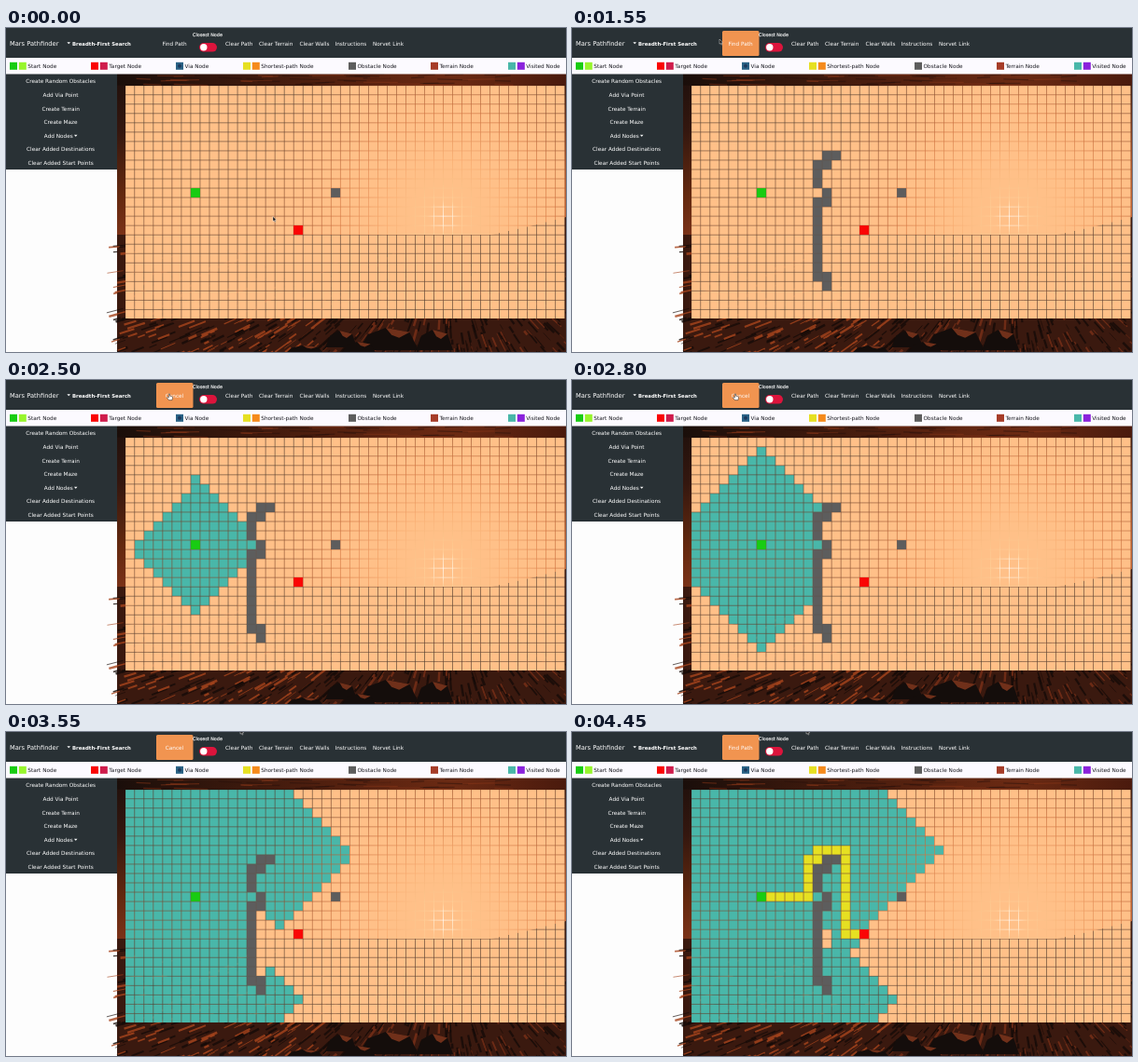
An HTML page that plays this animation: 600x348 px, repeating every 4.5 s.

```html
<!DOCTYPE html>
<html lang="en">
<head>
<meta charset="utf-8">
<title>Pathfinding grid</title>
<style>
  html, body { margin: 0; width: 100%; height: 100%; overflow: hidden; background: #fdfdfd; }
  svg { display: block; width: 100vw; height: 100vh; }
  text { font-family: "DejaVu Sans", Verdana, sans-serif; font-size: 5.75px; fill: #fff; }
</style>
</head>
<body>
<svg id="stage" viewBox="0 0 600 348">
  <defs>
    <linearGradient id="sky" x1="0" y1="0" x2="0" y2="1">
      <stop offset="0" stop-color="#1f100c"/>
      <stop offset=".35" stop-color="#34170f"/>
      <stop offset=".75" stop-color="#64290f"/>
      <stop offset="1" stop-color="#7a3218"/>
    </linearGradient>
    <linearGradient id="haze" x1="0" y1="0" x2="1" y2="0">
      <stop offset="0" stop-color="#1a0e0a"/>
      <stop offset=".5" stop-color="#55210f"/>
      <stop offset=".75" stop-color="#6b2a13"/>
      <stop offset="1" stop-color="#4a1a0d"/>
    </linearGradient>
    <radialGradient id="sun" gradientUnits="userSpaceOnUse" cx="470" cy="203" r="210">
      <stop offset="0" stop-color="#fff"/>
      <stop offset=".05" stop-color="#fff0d8"/>
      <stop offset=".09" stop-color="#ffd09a"/>
      <stop offset=".3" stop-color="#f8ab70"/>
      <stop offset=".55" stop-color="#dc7a44" stop-opacity=".9"/>
      <stop offset="1" stop-color="#a04520" stop-opacity="0"/>
    </radialGradient>
  </defs>
  <rect width="600" height="348" fill="#fdfdfd"/>
  <g id="scene">
    <rect x="119" y="50" width="481" height="172" fill="url(#sky)"/>
    <path d="M119 222H520Q560 214 600 203V348H119Z" fill="#3a190f"/>
    <g id="ground"></g>
    <rect x="128" y="62" width="470.5" height="250" fill="#86725a" opacity=".5"/>
    <path d="M119 50H600V203Q560 214 520 222H119Z" fill="url(#sun)"/>
    <rect x="119" y="49" width="481" height="12.6" fill="url(#haze)"/>
    <g id="clouds"></g>
  </g>
  <g id="cells"></g>
  <rect width="600" height="32.2" fill="#293135"/>
  <rect y="32.2" width="600" height="17.3" fill="#fcfaff"/>
  <rect y="49.5" width="119" height="102.5" fill="#293135"/>
  <rect id="button" x="161" y="3" width="39.5" height="27" rx="1.5" fill="#f19450"/>
  <g id="labels"></g>
  <path d="M65.4 15.2h3.6l-1.8 2.1z M72.9 114.7h3.6l-1.8 2.1z" fill="#fff"/>
  <rect x="207" y="16" width="19" height="9.6" rx="4.8" fill="#dc143c"/>
  <circle cx="211.8" cy="20.8" r="3.7" fill="#fff"/>
  <path id="arrow" d="M0 0V5.2L1.2 4.2 2 6.1 2.9 5.7 2.1 3.9H3.7Z" fill="#111" stroke="#fff" stroke-width=".4"/>
  <path id="hand" d="M-.6 0Q0-.8.6 0V2.2L3 2.8Q3.7 3 3.5 4L3 6.6H-.6L-2.6 3.8Q-2.2 2.8-.6 4Z" fill="#fff" stroke="#222" stroke-width=".5"/>
</svg>
<script>
const NS = "http://www.w3.org/2000/svg";
const LOOP = 4500, STEP = 50;
const COLS = 47, ROWS = 25, PITCH = 10.02, LEFT = 127.8, TOP = 61.8, GAP = .64;
const COLOR = {
  empty: "#ffc088", wall: "#5d5d5d", visited: "#49b7a9",
  path: "#e6e022", start: "#18cc12", target: "#fa0505"
};
const SOLID = new Set(["wall", "start", "target"]);
const $ = id => document.getElementById(id);

function add(parent, tag, attrs, content) {
  const el = document.createElementNS(NS, tag);
  for (const key in attrs) el.setAttribute(key, attrs[key]);
  if (content) el.textContent = content;
  parent.appendChild(el);
  return el;
}
const label = (x, y, content, attrs) => add($("labels"), "text", { x, y, ...attrs }, content);

// Header, legend and side menu
label(4, 18.9, "Mars Pathfinder", { style: "font-size:6.7px" });
label(71, 18.5, "Breadth-First Search", { style: "font-size:5.37px;font-weight:bold" });
label(200, 9, "Closest Node", { style: "font-size:4.87px", stroke: "#fff", "stroke-width": .15 });
const action = label(180.5, 18.6, "Find Path", { "text-anchor": "middle" });
[[235, "Clear Path"], [271, "Clear Terrain"], [314.5, "Clear Walls"],
 [352.5, "Instructions"], [393, "Norvet Link"]].forEach(([x, name]) => label(x, 18.6, name));

[[4, "Start", "#18cc12", "#97f52c"], [91, "Target", "#fa0505", "#cf1c4c"],
 [182, "Via", "#2a6285"], [254, "Shortest-path", "#e6e022", "#f58a1c"],
 [367, "Obstacle", "#5d5d5d"], [455, "Terrain", "#a63c28"],
 [538, "Visited", "#49b7a9", "#8a22dc"]].forEach(([x, name, ...fills]) => {
  fills.forEach((fill, i) =>
    add($("labels"), "rect", { x: x + i * 9.8, y: 36.8, width: 8, height: 8, fill }));
  label(x + fills.length * 9.8 - .3, 43.3, name + " Node", { style: "fill:#18181e" });
});
add($("labels"), "circle", { cx: 186, cy: 40.8, r: 2, fill: "#1c3a5e" });

["Create Random Obstacles", "Add Via Point", "Create Terrain", "Create Maze",
 "Add Nodes", "Clear Added Destinations", "Clear Added Start Points"].forEach((name, i) =>
  label(i === 4 ? 56.3 : 58.6, 59.2 + i * 14.65, name, { "text-anchor": "middle" }));

let seed = 11;
const rand = () => (seed = seed * 16807 % 2147483647) / 2147483647;

// Light and shadow streaks on the ground point away from the sun
for (let i = 0; i < 620; i++) {
  const x = 119 + rand() * 481, y = 222 + 128 * Math.sqrt(rand());
  const dx = x - 470, dy = (y - 203) * .9, len = Math.hypot(dx, dy) || 1;
  const reach = 4 + rand() * 16, lit = rand() < (x < 345 ? .5 : .3);
  add($("ground"), "path", {
    d: `M${x} ${y}l${dx / len * reach} ${dy / len * reach}`,
    stroke: lit ? (x < 345 ? "#a8451d" : "#7a3018") : "#150b08",
    "stroke-width": .6 + rand() * 2.2, opacity: .8
  });
}

// Boulders: dark body, one sunlit face
[[359, 334, 17, 9], [410, 334, 32, 12], [459, 335, 20, 11], [378, 343, 18, 6], [320, 345, 20, 4]]
  .forEach(([x, y, w, h]) => {
    add($("ground"), "path", {
      d: `M${x - w} ${y + h}L${x - w * .7} ${y - h * .4} ${x - w * .1} ${y - h} ${x + w * .7} ${y - h * .6} ${x + w} ${y + h}Z`,
      fill: "#140d0b"
    });
    add($("ground"), "path", {
      d: `M${x - w * .1} ${y - h}L${x + w * .7} ${y - h * .6} ${x + w * .35} ${y - h * .1} ${x + w * .1} ${y - h * .35}Z`,
      fill: "#70301a"
    });
  });

// Cloud streaks above the grid
for (let i = 0; i < 45; i++) {
  const x = 130 + rand() * 440;
  add($("clouds"), "path", {
    d: `M${x} ${50 + rand() * 11}l${12 + rand() * 26} ${rand() * 3 - 1.5}`,
    stroke: rand() < .5 ? "#8a3719" : "#2a110b", "stroke-width": 1.2, opacity: .5
  });
}

// Grid model
const id = (c, r) => r * COLS + c;
const START = id(7, 11), TARGET = id(18, 15), LONE = id(22, 11);
const drawn = [[15, 7], [14, 7], [14, 8], [13, 8], [13, 9], [13, 10], [14, 11], [14, 12], [13, 12]];
for (let r = 13; r <= 20; r++) drawn.push([13, r]);
drawn.push([14, 20], [14, 21]);
const walls = drawn.map(([c, r]) => id(c, r));

function search() {
  const blocked = new Set([...walls, LONE]);
  const parent = new Map([[START, -1]]), queue = [START], order = [];
  for (let head = 0; head < queue.length; head++) {
    const c = queue[head] % COLS, r = Math.floor(queue[head] / COLS);
    for (const [dc, dr] of [[0, 1], [1, 0], [0, -1], [-1, 0]]) {
      const x = c + dc, y = r + dr, next = id(x, y);
      if (x < 0 || y < 0 || x >= COLS || y >= ROWS || blocked.has(next) || parent.has(next)) continue;
      parent.set(next, queue[head]);
      if (next === TARGET) {
        const path = [];
        for (let p = queue[head]; p !== START; p = parent.get(p)) path.unshift(p);
        return { order, path };
      }
      queue.push(next);
      order.push(next);
    }
  }
}
const { order, path } = search();

// The wave advances at a steady rate through two known positions
const nearCount = order.indexOf(id(13, 6)), farCount = order.indexOf(id(24, 6));
const rate = (farCount - nearCount) / 750;
const waveCount = t => Math.floor(nearCount + .5 + (t - 2800) * rate);
const waveEnd = 2800 + (order.length - nearCount) / rate;
const PATH_END = 4380;

const cells = [], shown = [];
for (let i = 0; i < COLS * ROWS; i++) {
  cells.push(add($("cells"), "rect", {
    x: LEFT + (i % COLS) * PITCH + GAP / 2,
    y: TOP + Math.floor(i / COLS) * PITCH + GAP / 2,
    width: PITCH - GAP, height: PITCH - GAP, "stroke-width": GAP
  }));
}
function paint(i, kind) {
  if (shown[i] === kind) return;
  shown[i] = kind;
  cells[i].setAttribute("fill", COLOR[kind]);
  cells[i].setAttribute("stroke", SOLID.has(kind) ? COLOR[kind] : "none");
}

const track = [
  [0, 286, 202.4], [350, 283, 137], [395, 273, 138], [440, 273, 146], [485, 264, 148],
  [575, 264, 166], [620, 270, 176], [665, 272, 186], [710, 264, 188], [850, 259, 224.6],
  [1070, 261, 266], [1115, 270, 268], [1170, 273, 278], [1550, 158, 12], [1750, 175, 15],
  [2900, 175, 15], [3450, 251, -3], [LOOP, 251, -3]
];
function pointer(t) {
  const i = track.findIndex(k => k[0] > t);
  const [t0, x0, y0] = track[i - 1], [t1, x1, y1] = track[i];
  const u = (t - t0) / (t1 - t0), e = u * u * (3 - 2 * u);
  return [x0 + (x1 - x0) * e, y0 + (y1 - y0) * e];
}

function render(t) {
  const state = new Array(cells.length).fill("empty");
  const mark = (list, n, kind) => list.slice(0, Math.max(0, n)).forEach(i => state[i] = kind);
  mark(order, waveCount(t), "visited");
  mark(path, Math.ceil((t - waveEnd) / (PATH_END - waveEnd) * path.length), "path");
  mark(walls, Math.floor((t - 350) / 45) + 1, "wall");
  state[LONE] = "wall";
  state[START] = "start";
  state[TARGET] = "target";
  state.forEach((kind, i) => paint(i, kind));

  action.textContent = t >= 2300 && t < 4400 ? "Cancel" : "Find Path";
  $("button").style.display = t >= 1530 ? "" : "none";
  const [x, y] = pointer(t), overButton = t >= 1600 && t < 3050;
  $("arrow").style.display = overButton ? "none" : "";
  $("hand").style.display = overButton ? "" : "none";
  $(overButton ? "hand" : "arrow").setAttribute("transform", `translate(${x} ${y})`);
}

const begin = performance.now();
function tick() {
  const t = (performance.now() - begin) % LOOP;
  render(Math.floor(t / STEP) * STEP);
  requestAnimationFrame(tick);
}
tick();
</script>
</body>
</html>
```
